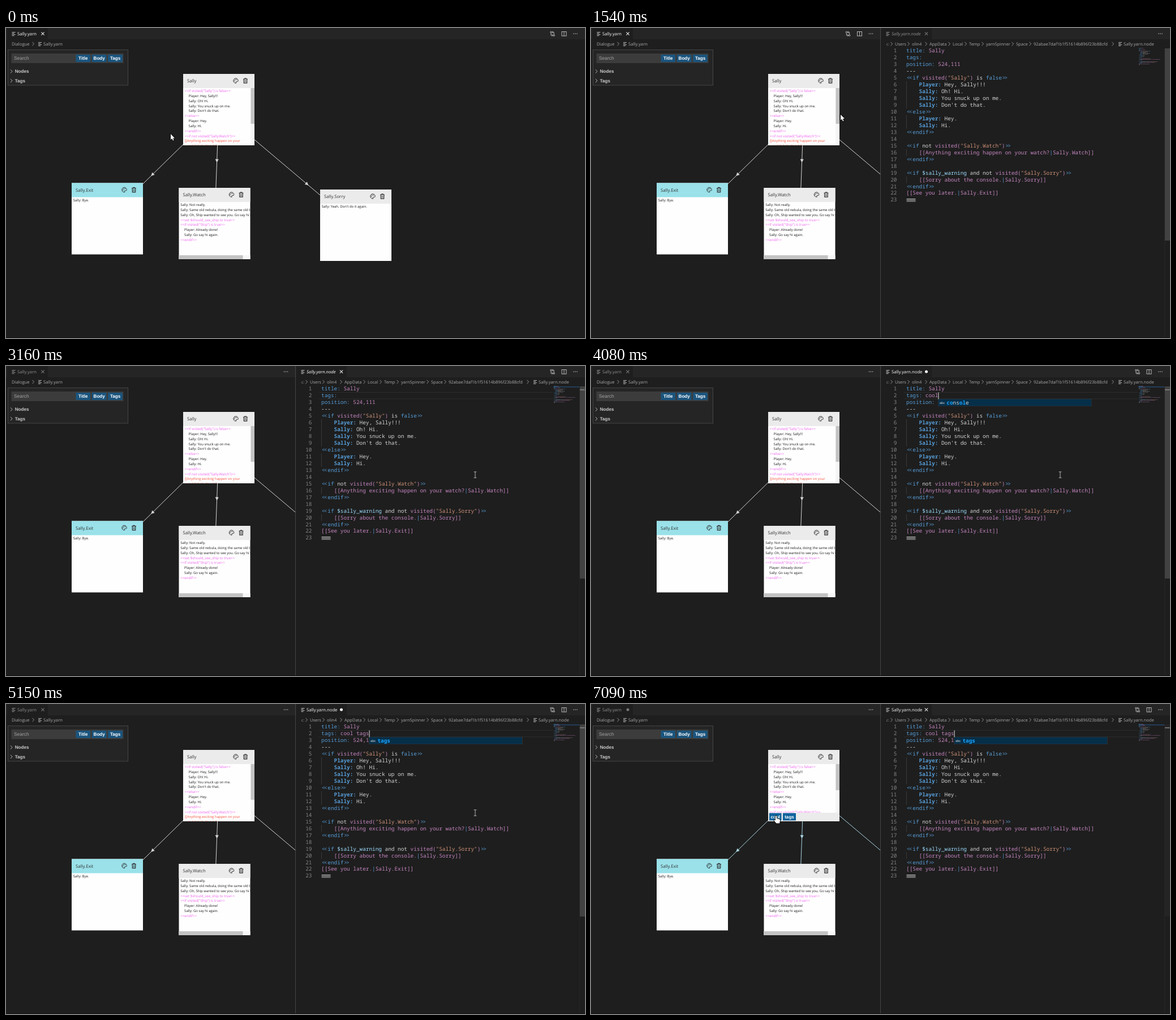
Animation, 1023 px wide and 547 px high, one loop 7320 ms. Source, as an HTML page with a canvas:

```html
<!DOCTYPE html>
<html lang="en">
<head>
<meta charset="utf-8">
<title>Dialogue editor</title>
<style>
html, body { margin: 0; width: 100%; height: 100%; overflow: hidden; background: #1e1e1e; }
canvas { display: block; }
</style>
</head>
<body>
<canvas id="stage" width="1023" height="547"></canvas>
<script>
const ctx = document.getElementById('stage').getContext('2d');
const LOOP = 7320, W = 1023, H = 547, SPLIT = 511;
const CW = 5.628, CODE_X = 557, LINE = 11.96;
const BLUE = '#569cd6', PURPLE = '#c586c0', STRING = '#ce9178', PLAIN = '#d4d4d4', VAR = '#9cdcfe';

const ui = (size, style = '') => `${style} ${size}px "Open Sans", sans-serif`;
const sans = (size, style = '') => `${style} ${size}px "Liberation Sans", Arial, sans-serif`;
const mono = (style = '', size = 9.38) => `${style} ${size}px "Noto Sans Mono", monospace`;

const CODE = `title: Sally
tags: 
position: 524,111
---
<<if visited("Sally") is false>>
    Player: Hey, Sally!!!
    Sally: Oh! Hi.
    Sally: You snuck up on me.
    Sally: Don't do that.
<<else>>
    Player: Hey.
    Sally: Hi.
<<endif>>

<<if not visited("Sally.Watch")>>
    [[Anything exciting happen on your watch?|Sally.Watch]]
<<endif>>

<<if $sally_warning and not visited("Sally.Sorry")>>
    [[Sorry about the console.|Sally.Sorry]]
<<endif>>
[[See you later.|Sally.Exit]]
===`.split('\n');

const NODES = [
  { title: 'Sally', x: 313, y: 81, head: '#ebebeb', thumbY: true, body: [
    ...CODE.slice(4, 13), CODE[14], '[[Anything exciting happen on your', 'watch?|Sally.Watch]]'] },
  { title: 'Sally.Exit', x: 116, y: 273.5, head: '#9ae1e9', body: ['Sally: Bye.'], arrow: 0.597 },
  { title: 'Sally.Watch', x: 305.5, y: 282, head: '#ebebeb', thumbX: true, arrow: 0.45, body: [
    'Sally: Not really.', 'Sally: Same old nebula, doing the same old thing.',
    'Sally: Oh, Ship wanted to see you. Go say hi to them.', '<<set $should_see_ship to true>>',
    '<<if visited("Ship") is true>>', '    Player: Already done!', '    Sally: Go say hi again.', '<<endif>>'] },
  { title: 'Sally.Sorry', x: 555, y: 285, head: '#ebebeb', body: ["Sally: Yeah. Don't do it again."], arrow: 0.645 },
];
const SIZE = 126, HEAD = 25;

const CRUMBS = [['c:', 522], ['Users', 537], ['olin4', 567], ['AppData', 598], ['Local', 639], ['Temp', 668],
  ['yarnSpinner', 698], ['Space', 751], ['92abae7daf1b1f51614b896f23b88cfd', 782], ['', 928]];

const TYPED = [[0, ''], [3540, 'c'], [3770, 'co'], [3850, 'coo'], [4080, 'cool'], [4230, 'cool '],
  [4690, 'cool t'], [4850, 'cool ta'], [5000, 'cool tag'], [5150, 'cool tags']];
const HINTS = { c: ['console'], t: ['tags', 'title', 'that', 'visited'], ta: ['tags', 'that'] };

// start, step length, steps, x, y, ease power
const MOVES = [
  [300, 78, 6, 357, 153, 1.5], [1540, 75, 3, 609, 152, 1], [1770, 80, 1, 634, 110.5, 1],
  [1850, 76.5, 10, 634, 54.5, 2.5], [2620, 77, 8, 829, 192, 1.5], [5930, 78, 3, 705, 188, 1],
  [6240, 76.5, 4, 442, 212, 1], [6547, 77, 4, 346, 200, 1.5], [6930, 80, 3, 327, 198, 1],
];

function rect(x, y, w, h, color) {
  ctx.fillStyle = color;
  ctx.fillRect(x, y, w, h);
}
function text(s, x, y, font, color) {
  ctx.font = font;
  ctx.fillStyle = color;
  ctx.fillText(s, x, y);
}
function line(color, width, ...p) {
  ctx.strokeStyle = color;
  ctx.lineWidth = width;
  ctx.beginPath();
  for (let i = 0; i < p.length; i += 2) ctx.lineTo(p[i], p[i + 1]);
  ctx.stroke();
}
function ring(x, y, r, color, width = 1) {
  ctx.strokeStyle = color;
  ctx.lineWidth = width;
  ctx.beginPath();
  ctx.arc(x, y, r, 0, 7);
  ctx.stroke();
}
function dot(x, y, r, color) {
  ctx.fillStyle = color;
  ctx.beginPath();
  ctx.arc(x, y, r, 0, 7);
  ctx.fill();
}
function at(x, y, draw) {
  ctx.save();
  ctx.translate(x, y);
  draw();
  ctx.restore();
}
function clip(x, y, w, h, draw) {
  ctx.save();
  ctx.beginPath();
  ctx.rect(x, y, w, h);
  ctx.clip();
  draw();
  ctx.restore();
}

const chevron = (x, y, c = '#a0a0a0') => line(c, 0.9, x - 1.6, y - 3.2, x + 1.6, y, x - 1.6, y + 3.2);
const cross = (x, y, c) => {
  line(c, 1.1, x - 2.6, y - 2.6, x + 2.6, y + 2.6);
  line(c, 1.1, x + 2.6, y - 2.6, x - 2.6, y + 2.6);
};
const fileIcon = (x, y, c) => {
  for (let i = 0; i < 4; i++) rect(x - 3, y - 3 + i * 2, i % 2 ? 4 : 6, 0.9, c);
};
const more = x => [-3, 0, 3].forEach(d => dot(x + d, 10, 0.8, '#c5c5c5'));
function tools(x) {
  const c = '#c5c5c5';
  ring(x - 2.6, 7.4, 1.3, c, 0.9);
  ring(x + 2.6, 13, 1.3, c, 0.9);
  line(c, 0.9, x - 2.6, 9, x - 2.6, 13, x + 0.4, 13);
  line(c, 0.9, x + 2.6, 11.4, x + 2.6, 7.4, x - 0.4, 7.4);
  line(c, 0.9, x - 1, 11.3, x + 0.8, 13, x - 1, 14.7);
  line(c, 0.9, x + 1, 5.7, x - 0.8, 7.4, x + 1, 9.1);
  ctx.strokeRect(x + 16.5, 6.5, 8, 7.5);
  line(c, 0.9, x + 20.5, 6.5, x + 20.5, 14);
}

function palette() {
  const c = '#2b2b2b';
  ctx.strokeStyle = c;
  ctx.lineWidth = 1;
  ctx.beginPath();
  ctx.arc(0, 0, 4.2, 1.4, 5.9 + 0.6);
  ctx.bezierCurveTo(4, 2.4, 0.8, 0.4, 0.4, 2);
  ctx.quadraticCurveTo(0.2, 3, 0.8, 4.1);
  ctx.stroke();
  [[-2.3, 0.2], [-1.2, -2], [1.3, -2]].forEach(p => dot(...p, 0.8, c));
}
function trash() {
  const c = '#2b2b2b';
  line(c, 1, -3.9, -2.9, 3.9, -2.9);
  line(c, 1, -1.5, -3, -1.5, -4.2, 1.5, -4.2, 1.5, -3);
  line(c, 1.1, -2.9, -2.9, -2.7, 4.1, 2.7, 4.1, 2.9, -2.9);
  line(c, 0.8, -0.9, -1.2, -0.9, 2.6);
  line(c, 0.8, 0.9, -1.2, 0.9, 2.6);
}

function edge(a, b, color) {
  const x0 = a.x + SIZE / 2, y0 = a.y + SIZE / 2;
  const dx = b.x + SIZE / 2 - x0, dy = b.y + SIZE / 2 - y0;
  line(color, 1, x0, y0, x0 + dx, y0 + dy);
  at(x0 + dx * b.arrow, y0 + dy * b.arrow, () => {
    ctx.rotate(Math.atan2(dy, dx));
    ctx.fillStyle = color;
    ctx.beginPath();
    ctx.moveTo(3, 0);
    ctx.lineTo(-3, -3);
    ctx.lineTo(-3, 3);
    ctx.fill();
  });
}

function tag(s, x, y, w, color) {
  rect(x, y, w, 13, color);
  ctx.textAlign = 'center';
  text(s, x + w / 2, y + 9.3, sans(8.1, 'bold'), '#fff');
  ctx.textAlign = 'left';
}

function node(n, tagged) {
  const { x, y } = n, top = y + HEAD, bodyH = SIZE - HEAD - (tagged ? 15 : 0);
  rect(x, y, SIZE, SIZE, '#fefefe');
  rect(x, y, SIZE, HEAD, n.head);
  text(n.title, x + 7, y + 15.3, ui(7.75), '#333');
  at(x + 93, y + 12, palette);
  at(x + 110, y + 12, trash);
  clip(x, top, SIZE, bodyH, () => n.body.forEach((s, i) => {
    const cmd = s.startsWith('<<'), link = i > 9;
    const color = cmd ? '#ee62ee' : link ? '#f4503c' : '#1c1c1c';
    text(s.trim(), x + (s[0] === ' ' ? 9.6 : 2.7), top + 7.1 + i * 8.83, ui(cmd ? 6.18 : 6.03), color);
  }));
  if (n.thumbY) {
    rect(x + 119, top, 7, bodyH, '#f6f6f6');
    rect(x + 119.5, top, 6.5, tagged ? 46 : 63, '#c3c3c3');
  }
  if (n.thumbX) {
    rect(x, y + 119, SIZE, 7, '#f6f6f6');
    rect(x, y + 119, 113, 7, '#c3c3c3');
  }
  if (tagged) {
    rect(x, top + bodyH, SIZE, 15, '#ebebeb');
    tag('cool', x + 2, y + 111.5, 21.5, '#0e639c');
    tag('tags', x + 26, y + 111.5, 23, '#0e639c');
  }
}

function searchPanel() {
  rect(3, 38, 213, 63.5, '#454545');
  rect(4, 39, 211, 61.5, '#252526');
  rect(9.5, 45, 198, 17, '#3c3c3c');
  text('Search', 14, 56, sans(8.4), '#a3a3a3');
  ['Title', 'Body', 'Tags'].forEach((s, i) => tag(s, 123.5 + i * 28.4, 47, 25.5, '#1b557e'));
  ['Nodes', 'Tags'].forEach((s, i) => {
    chevron(9.5, 76.5 + i * 16.5, '#c5c5c5');
    text(s, 15.7, 79.4 + i * 16.5, sans(8.1, 'bold'), '#ccc');
  });
}

function tab(x, w, title, closeX, { active, italic, dirty }) {
  const c = active ? '#fff' : '#8f8f8f';
  rect(x, 0, w, 20, '#1e1e1e');
  fileIcon(x + 11.5, 10, active ? '#d0d0d0' : '#9a9a9a');
  text(title, x + 18, 13, ui(7.7, italic ? 'italic' : ''), c);
  if (dirty) dot(closeX, 10, 2.5, active ? '#fff' : '#777');
  else cross(closeX, 10, active ? '#e8e8e8' : '#777');
}

function graph(s) {
  const color = s.hover ? '#add8e6' : '#d6d6d6';
  NODES.slice(1).forEach(n => edge(NODES[0], n, color));
  NODES.forEach((n, i) => node(n, !i && s.saved));
  searchPanel();
  rect(0, 0, W, 20, '#252526');
  tab(2, 72, 'Sally.yarn', 65, { active: !s.focus, dirty: s.saved });
  text('Dialogue', 10, 31, ui(7.7), '#a9a9a9');
  chevron(48, 28);
  fileIcon(60, 28, '#c0c0c0');
  text('Sally.yarn', 66, 31, ui(7.7), '#a9a9a9');
  const end = s.split ? 494.5 : 1006;
  more(end);
  if (!s.focus) tools(end - 40.5);
}

function tokens(s, row) {
  if (s.trim().startsWith('[[')) return [...s.matchAll(/\||[^|]+/g)].map(m => [m[0], m.index, m[0] === '|' ? BLUE : PURPLE]);
  if (row < 3) {
    const n = s.indexOf(':') + 1;
    return [[s.slice(0, n), 0, BLUE], [s.slice(n), n, PURPLE]];
  }
  return [...s.matchAll(/<<|>>|"[^"]*"|\$\w+|\w+:|[\w']+|[^\s\w"<>$]+/g)].map(({ 0: w, index }) => [w, index,
    /^(<<|>>|if|else|endif|false|\w+:)$/.test(w) ? BLUE : w[0] === '"' ? STRING :
    w[0] === '$' ? VAR : w === 'visited' || /^[()]$/.test(w) ? PURPLE : PLAIN]);
}

function codeLine(s, row) {
  const y = 43.3 + row * LINE;
  ctx.textAlign = 'right';
  text(row + 1, 540.5, y, mono(), '#858585');
  ctx.textAlign = 'left';
  if (s[0] === ' ') rect(CODE_X, y - 9, 0.8, LINE, '#404040');
  if (s === '===') {
    for (let i = 0; i < 3; i++) rect(CODE_X + 0.5, y - 5.4 + i * 2.2, 16, 0.9, PLAIN);
    return;
  }
  for (const [w, col, color] of tokens(s, row)) {
    const x = CODE_X + col * CW;
    if (w === '<<' || w === '>>') {
      text(w[0], x + 0.7, y, mono(), color);
      text(w[0], x + CW - 0.9, y, mono(), color);
    } else text(w, x, y, mono(row > 4 && /\w:$/.test(w) ? '600' : ''), color);
  }
}

function suggestions(x, word, items) {
  const h = 12 * items.length + 1;
  rect(x, 58, 271, h, '#454545');
  rect(x + 0.5, 58.5, 270, h - 1, '#252526');
  rect(x + 0.5, 58.5, 270, 12, '#062f4a');
  items.forEach((item, i) => {
    const y = 67.6 + i * 12;
    text('abc', x + 2.5, y - 0.4, sans(5.8), '#ddd');
    let hit = 0;
    [...item].forEach((ch, k) => {
      const match = ch === word[hit];
      if (match) hit++;
      text(ch, x + 15 + k * CW, y, mono(match ? 'bold' : ''), match ? '#18a3ff' : PLAIN);
    });
  });
}

function minimap(lines, focus) {
  if (focus) rect(967, 36.2, 46, 1.3, '#264f78');
  ctx.globalAlpha = 0.5;
  lines.forEach((s, row) => {
    for (const [w, col, color] of tokens(s, row)) {
      let i = col;
      for (const ch of w) {
        if (ch !== ' ') rect(968 + i * 0.64, 35 + row * 1.33, 0.55, 0.9, color);
        i++;
      }
    }
  });
  ctx.globalAlpha = 1;
}

function editor(s, t) {
  rect(SPLIT, 0, W - SPLIT, H, '#1e1e1e');
  rect(SPLIT, 0, W - SPLIT, 20, '#252526');
  rect(SPLIT, 0, 1, H, '#444');
  tab(513, 89, 'Sally.yarn.node', 592.5, { active: s.focus, italic: !s.typed, dirty: s.typed && !s.saved });
  more(1006);
  if (s.focus) tools(965.5);
  if (!s.loaded) return;

  CRUMBS.forEach(([name, x], i) => {
    if (i) chevron(x - 6, 28);
    text(name, x, 31, ui(i ? 7.5 : 6.6), '#a9a9a9');
  });
  fileIcon(935, 28, '#c0c0c0');
  text('Sally.yarn.node', 941, 31, ui(7.6), '#a9a9a9');

  if (s.focus) {
    rect(553, 46, 413, 1, '#2c2c2c');
    rect(553, 57.5, 413, 1, '#2c2c2c');
  }
  const lines = CODE.slice();
  lines[1] += s.typed;
  lines.forEach(codeLine);
  minimap(lines, s.focus);

  rect(1013, 36, 1, H - 37, '#262626');
  ctx.globalAlpha = Math.max(0.15, Math.min(1, 1 - (t - 6600) / 500));
  rect(1014, 36, 9, 339, '#424242');
  ctx.globalAlpha = 1;
  if (s.focus) rect(1014, 41.3, 8.5, 1.4, '#8c8c8c');

  const caretX = CODE_X + lines[1].length * CW;
  const word = s.typed.split(' ').pop();
  const items = HINTS[word] || (word[0] === 'c' ? HINTS.c : ['tags']);
  if (word && !(t >= 4690 && t < 4770)) suggestions(caretX, word, items);
  if (s.caret) rect(caretX, 46.5, 1.2, 12, '#c8c8c8');
}

function outline(path, width = 1.6) {
  ctx.lineJoin = 'round';
  ctx.strokeStyle = '#000';
  ctx.lineWidth = width;
  ctx.stroke(path);
  ctx.fillStyle = '#fff';
  ctx.fill(path);
}
const ARROW = new Path2D('M0 0V10.2L2.3 8.1L3.9 11.8L5.6 11L4 7.4H7.2Z');
const POINTER = new Path2D('M-1.2 0Q0 -1.4 1.1 0V4.2L6 5.2Q7.2 5.8 7 7.5L6.2 12.4H0.4L-3.4 8Q-3.8 6.4 -2.4 6.6L-1.2 7.6Z');
const HAND = new Path2D('M-2 5.5L-5.6 .6Q-5.2 -.8 -3.8 0L-2.9 .8L-4 -3.2Q-3.2 -4.6 -2.2 -3.4L-1.4 -1.2L-1.5 -4.8Q-.4 -6 .4 -4.8L.8 -1.4L1.6 -4.6Q2.8 -5.4 3.2 -4L2.9 -.8L4 -2.8Q5.4 -3 5.2 -1.6L3.6 3.8L3.2 5.5Z');
const FIST = new Path2D('M-2 5.5L-4.8 1.8Q-4.6 .4 -3.4 .6V-1.2Q-2.4 -2.6 -1.4 -1.8Q-.4 -3 .6 -2Q1.8 -2.8 2.6 -1.6Q4.2 -2 4.4 -.4L3.8 3.6L3.2 5.5Z');

function cursor(s) {
  at(s.x, s.y, () => {
    if (s.kind === 'beam') {
      line('#c4c4c4', 0.9, 0, -5, 0, 5);
      for (const y of [-5.2, 5.2]) line('#c4c4c4', 0.9, -2.4, y, 2.4, y);
    } else if (s.kind === 'hand') outline(s.grab ? FIST : HAND);
    else if (s.kind === 'pointer') outline(POINTER);
    else {
      outline(ARROW);
      if (s.saved) ring(8.5, 0, 3.7, '#2389e0', 2.3);
    }
  });
}

function stateAt(t) {
  const s = {
    split: t >= 1390, loaded: t >= 1460, focus: t >= 2620, saved: t >= 5780,
    grab: (t >= 1070 && t < 1150) || (t >= 1220 && t < 1300),
    typed: TYPED.filter(e => t >= e[0]).pop()[1],
    caret: t >= 2620 && ![[3150, 3540], [5630, 6085], [6620, 7085]].some(([a, b]) => t >= a && t < b),
    x: 291, y: 187,
  };
  for (const [t0, step, n, x, y, pow] of MOVES) {
    if (t < t0) break;
    const k = Math.min(n, Math.floor((t - t0) / step + 0.01) + 1) / n;
    const e = 1 - (1 - k) ** pow;
    s.x += (x - s.x) * e;
    s.y += (y - s.y) * e;
  }
  const n = NODES[0];
  s.hover = s.x > n.x && s.x < n.x + SIZE && s.y > n.y && s.y < n.y + SIZE;
  s.kind = s.split && s.x > SPLIT ? 'beam' : !s.hover ? 'arrow' :
    s.saved && s.y > 192 && s.x < 362 ? 'pointer' : 'hand';
  return s;
}

function frame(now) {
  const t = now % LOOP, s = stateAt(t);
  ctx.textRendering = 'geometricPrecision';
  rect(0, 0, W, H, '#1e1e1e');
  graph(s);
  if (s.split) editor(s, t);
  rect(0, H - 1, W, 1, '#121212');
  cursor(s);
  requestAnimationFrame(frame);
}
requestAnimationFrame(frame);
</script>
</body>
</html>
```
